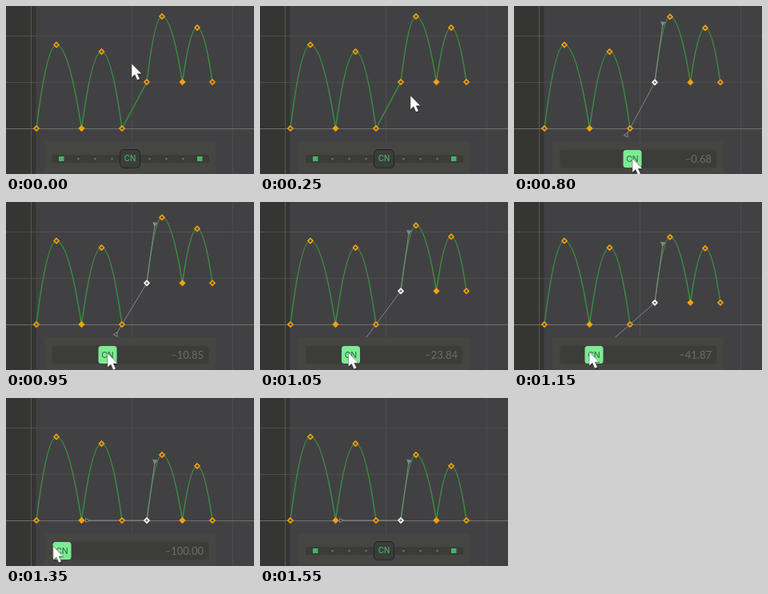
An HTML page for the animation above (1900 ms loop, 310 px wide and 210 px high).

```html
<!DOCTYPE html>
<html lang="en">
<head>
<meta charset="utf-8">
<title>Curve slider</title>
<style>
  html, body { margin: 0; width: 100%; height: 100%; overflow: hidden; background: #414143; }
  svg { display: block; width: 310px; height: 210px; }
  text { user-select: none; }
  .label { font: 500 9.7px Inter, "Open Sans", sans-serif; text-anchor: middle; }
  .value { font: 13px Lato, "Open Sans", sans-serif; text-anchor: end; fill: #6c6c6b; }
</style>
</head>
<body>
<svg viewBox="0 0 310 210">
  <rect width="310" height="210" fill="#414143"/>
  <rect width="37.5" height="210" fill="#353534"/>
  <path d="M157.5 0V210M283.5 0V210M0 37.5H310M0 95.5H310" stroke="#4d4d4d"/>
  <path d="M31.5 0V210" stroke="#575751"/>
  <path d="M0 153.5H310" stroke="#70716c"/>
  <path id="curve" fill="none" stroke="#3b8b40" stroke-width="1.5"/>
  <g id="tangents" stroke="#858585" fill="none">
    <path id="tangentLines"/>
    <path id="tipIn" d="M-2.5 -2.5L2.500 0L-2.500 2.500Z" fill="#414143"/>
    <path id="tipOut" d="M-2 -2.500L2.500 0L-2 2.500Z" fill="#858585"/>
  </g>
  <g id="keys" stroke-width="1.6"></g>

  <rect x="48" y="169" width="214" height="41" fill="#454542"/>
  <g id="idle">
    <rect x="57" y="186" width="197" height="10" rx="3" fill="#3b3b39"/>
    <path d="M66 188h6.500v6h-6.500zM239 188h6.500v6h-6.500z" fill="#47b367"/>
    <path d="M89.500 191H134M178.500 191H223" stroke="#3f9e5c" stroke-width="2" stroke-dasharray="2 19"/>
    <rect x="142.500" y="179.500" width="25" height="23" rx="5" fill="#3c3c3a" stroke="#222"/>
    <text class="label" x="155" y="194.400" fill="#47b367">CN</text>
  </g>
  <g id="active">
    <rect x="57.500" y="179.500" width="196" height="23" rx="4" fill="#3c3c3b"/>
    <text id="value" class="value" x="247" y="196"></text>
    <g id="thumb">
      <rect x="-11.500" y="180" width="23" height="22" rx="3.500" fill="#7ceb94"/>
      <text class="label" y="194.800" fill="#37764a" style="font-size:10.5px">CN</text>
    </g>
  </g>
  <g id="cursor">
    <path d="M1 1.500V19L5 15.300L8 22L11.200 20.700L8.200 14.200H13.500Z" fill="#000" opacity=".3"/>
    <path d="M0 0V17.500L4 13.800L7 20.600L10.200 19.200L7.200 12.700H12.500Z"
          fill="#fff" stroke="#303030" stroke-opacity=".5" stroke-width=".8"/>
  </g>
</svg>
<script>
const LOOP = 1900, STEP = 50;
const SELECT = 300, AIM = 550, PRESS = 750, RELEASE = 1500, LEAVE = 1550;
const CENTER = 155, TRAVEL = 85, DROP = 58, TANGENT = 74;
const OUT_ANGLE = Math.atan2(-73, 10);
const $ = id => document.getElementById(id);

// Time, then how far left the thumb, the curve and the hand have been pulled.
const pulls = [
  [PRESS, 0, 0, 0], [950, 28, 28, 28], [1150, 55, 62, 61], [1250, 70, 70, 86], [1350, 85, 85, 96]
];
// Each bounce group: ground, peak, ground, peak, ground.
const fixedKeys = [[38, 153], [63, 48.5], [94.5, 153], [119.5, 57], [145, 153]];
const movedKeys = [[176, 95], [195, 13], [220.5, 95], [239, 27], [258, 95]];

const clamp = u => Math.min(1, Math.max(0, u));
const mix = (a, b, u) => a.map((v, k) => v + (b[k] - v) * clamp(u));
const amount = pull => (pull / TRAVEL) ** 2;
const show = (el, on) => el.style.display = on ? "" : "none";

function pullAt(t) {
  const i = Math.max(1, pulls.findIndex(p => p[0] >= t));
  const [a, b] = t >= pulls.at(-1)[0] ? pulls.slice(-2) : [pulls[i - 1], pulls[i]];
  return mix(a, b, (t - a[0]) / (b[0] - a[0])).slice(1);
}

function pointerAt(t, hand) {
  if (t < SELECT) return mix([157, 72], [188, 112], t / 250);
  if (t < AIM) return mix([188, 112], [190, 145], (t - 250) / 100);
  if (t < PRESS) return mix([246, 192], [CENTER, 191], (t - AIM) / (PRESS - AIM));
  return t < RELEASE ? [CENTER - hand, 191 - hand * .06] : [50, 182];
}

const diamonds = [...fixedKeys, ...movedKeys].map(() => {
  const el = document.createElementNS("http://www.w3.org/2000/svg", "path");
  el.setAttribute("d", "M0 -3L3 0L0 3L-3 0Z");
  return $("keys").appendChild(el);
});

// Half a bounce: steep at the ground, flat at the peak.
function half(from, to) {
  const up = to[1] < from[1];
  const [ground, peak] = up ? [from, to] : [to, from];
  const w = peak[0] - ground[0], h = peak[1] - ground[1];
  const steep = [ground[0] + w * .33, ground[1] + h * .63];
  const flat = [peak[0] - w * .345, peak[1]];
  return up ? `C${steep} ${flat} ${to}` : `C${flat} ${steep} ${to}`;
}

const bounces = keys => keys.slice(1).map((key, i) => half(keys[i], key)).join("");

function drawTangents([x, y]) {
  const [px, py] = fixedKeys.at(-1);
  const angles = [Math.atan2(py - y, px - x), OUT_ANGLE];
  const ends = angles.map(a => [x + TANGENT * Math.cos(a), y + TANGENT * Math.sin(a)]);
  $("tangentLines").setAttribute("d", `M${ends[0]}L${x} ${y}L${ends[1]}`);
  ["tipIn", "tipOut"].forEach((id, i) => $(id).setAttribute("transform",
    `translate(${ends[i]}) rotate(${angles[i] * 180 / Math.PI + 180})`));
}

function drawKeys(keys, selected) {
  keys.forEach(([x, y], i) => {
    const chosen = selected && i === fixedKeys.length;
    const color = chosen ? "#fff" : "#f5a20d";
    const filled = i % fixedKeys.length === 2;
    diamonds[i].setAttribute("transform", `translate(${x} ${y})`);
    diamonds[i].setAttribute("stroke", color);
    diamonds[i].setAttribute("fill", filled ? color : chosen ? "#777" : "#5a4a30");
  });
}

function draw(t) {
  const selected = t >= SELECT, pressed = t >= PRESS && t < RELEASE;
  const [thumb, bend, hand] = pullAt(t);
  const moved = movedKeys.map(([x, y]) => [x, y + DROP * amount(bend)]);

  // The selected key's tangent takes the place of the joining line.
  $("curve").setAttribute("d",
    `M${fixedKeys[0]}${bounces(fixedKeys)}${selected ? "M" : "L"}${moved[0]}${bounces(moved)}`);
  drawKeys([...fixedKeys, ...moved], selected);
  show($("tangents"), selected);
  drawTangents(moved[0]);

  show($("idle"), !pressed);
  show($("active"), pressed);
  $("value").textContent = (thumb ? "–" : "") + (100 * amount(thumb)).toFixed(2);
  $("thumb").setAttribute("transform", `translate(${CENTER - thumb} 0)`);

  show($("cursor"), t < LEAVE);
  $("cursor").setAttribute("transform", `translate(${pointerAt(t, hand)})`);
}

const start = performance.now();
function tick() {
  const t = (performance.now() - start) % LOOP;
  draw(Math.floor(t / STEP) * STEP);
  requestAnimationFrame(tick);
}
tick();
</script>
</body>
</html>
```
